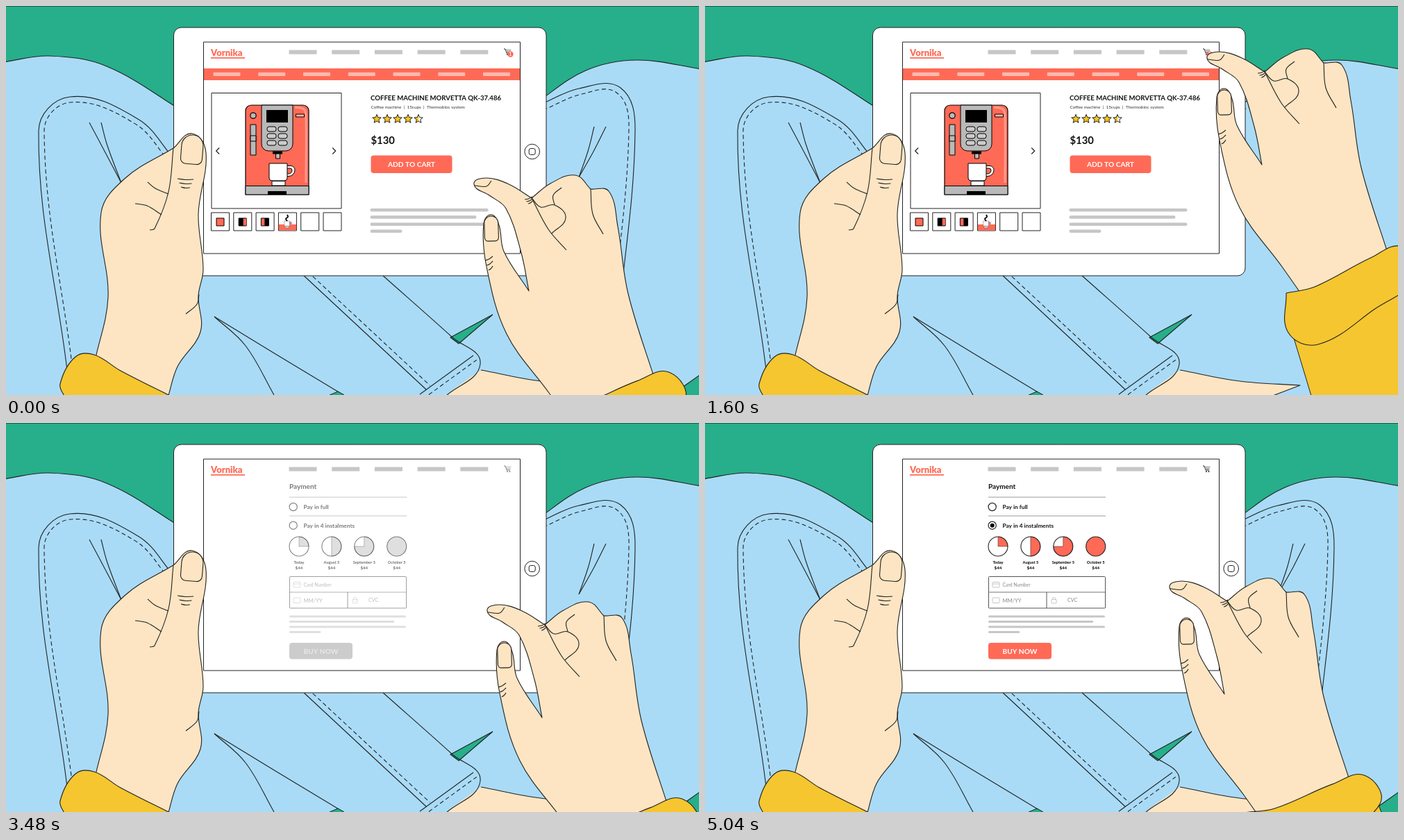
An HTML page with a canvas for the animation above (5.6 s loop, 998x561 px).

```html
<!DOCTYPE html>
<html lang="en">
<head>
<meta charset="utf-8">
<title>Paying in instalments</title>
<style>
html, body { margin: 0; width: 100%; height: 100%; overflow: hidden; }
canvas { display: block; }
</style>
</head>
<body>
<canvas id="stage" width="998" height="561"></canvas>
<script>
const g = document.getElementById('stage').getContext('2d');
const LOOP = 5600, STEP = 40, LAST = 5040;
const INK = '#222', CORAL = '#ff6a56', DARK_CORAL = '#e95543', GREY = '#c6c6c6', STEEL = '#b9b9b9';
const SKIN = '#fde5c3', YELLOW = '#f5c62f', BLUE = '#a9dbf7', GREEN = '#26af8a';

// Stops of the pointing fingertip: time, x, y
const TIP = [
  [0, 674, 256], [520, 562, 232], [800, 610, 221], [1200, 682, 130], [1600, 723, 74],
  [1800, 720, 61], [2160, 708, 106], [2400, 700, 196], [2800, 693, 270], [3600, 693, 270],
  [4000, 504, 181], [4240, 412, 138], [4800, 618, 199], [LAST, 669, 236]
];
const PANEL = [[1740, 150], [1960, -10], [2160, 4], [2360, 0]];

const clamp = (v, a = 0, b = 1) => Math.min(b, Math.max(a, v));
const ramp = (t, a, b) => clamp((t - a) / (b - a));
const repeat = (n, draw) => { for (let i = 0; i < n; i++) draw(i); };

// Cubic interpolation that rests wherever the direction turns
function track(keys, t, c) {
  const n = keys.length - 1;
  if (t <= keys[0][0]) return keys[0][c];
  if (t >= keys[n][0]) return keys[n][c];
  const i = keys.findIndex(k => k[0] > t) - 1;
  const slope = j => (keys[j + 1][c] - keys[j][c]) / (keys[j + 1][0] - keys[j][0]);
  const tangent = j => {
    if (j === 0 || j === n) return 0;
    const a = slope(j - 1), b = slope(j);
    return a * b <= 0 ? 0 : 2 * a * b / (a + b);
  };
  const h = keys[i + 1][0] - keys[i][0], u = (t - keys[i][0]) / h, v = 1 - u;
  return v * v * (1 + 2 * u) * keys[i][c] + u * u * (3 - 2 * u) * keys[i + 1][c]
    + h * (u * v * v * tangent(i) - u * u * v * tangent(i + 1));
}

function paint(fill, stroke, width = 1) {
  if (fill) { g.fillStyle = fill; g.fill(); }
  if (stroke) { g.strokeStyle = stroke; g.lineWidth = width; g.stroke(); }
}
function box(x, y, w, h, fill, stroke, r = 0, width = 1) {
  g.beginPath();
  g.roundRect(x, y, w, h, r);
  paint(fill, stroke, width);
}
function disc(x, y, r, fill, stroke, width = 1) {
  g.beginPath();
  g.arc(x, y, r, 0, 7);
  paint(fill, stroke, width);
}
function poly(p, fill, stroke, width = 1) {
  g.beginPath();
  for (let i = 0; i < p.length; i += 2) g.lineTo(p[i], p[i + 1]);
  paint(fill, stroke, width);
}
const line = (p, color = INK, width = 1) => poly(p, null, color, width);
const rule = (x, y, w, color = '#999') => line([x, y, x + w, y], color, 1.2);

function text(s, x, y, size, color = '#111', weight = 400, align = 'left') {
  g.font = `${weight} ${size}px Lato, sans-serif`;
  g.fillStyle = color;
  g.textAlign = align;
  g.fillText(s, x, y);
}
function placed(x, y, scale, angle, draw) {
  g.save();
  g.translate(x, y);
  g.rotate(angle);
  g.scale(scale, scale);
  draw();
  g.restore();
}

const point = (p, i) => {
  const k = clamp(i, 0, p.length / 2 - 1) * 2;
  return [p[k], p[k + 1]];
};
// Unit direction of a curve at one of its points
function heading(p, i) {
  const [ax, ay] = point(p, i - 1), [bx, by] = point(p, i + 1);
  const d = Math.hypot(bx - ax, by - ay) || 1;
  return [(bx - ax) / d, (by - ay) / d];
}
// Smooth curve through points; a doubled point makes a corner
function spline(p, fill, stroke = INK, width = 1.1) {
  g.beginPath();
  g.moveTo(p[0], p[1]);
  for (let i = 0; i < p.length / 2 - 1; i++) {
    const [ax, ay] = point(p, i), [bx, by] = point(p, i + 1);
    const [ux, uy] = heading(p, i), [vx, vy] = heading(p, i + 1);
    const d = Math.hypot(bx - ax, by - ay) * .36;
    g.bezierCurveTo(ax + ux * d, ay + uy * d, bx - vx * d, by - vy * d, bx, by);
  }
  paint(fill, stroke, width);
}
// A curve with a line of stitches running beside it
function seam(p, gap, curve = true) {
  if (curve) spline(p);
  const side = p.map((v, k) => {
    const [ux, uy] = heading(p, k >> 1);
    return v + gap * (k % 2 ? -ux : uy);
  });
  g.setLineDash([6, 4]);
  spline(side);
  g.setLineDash([]);
}
function wrinkles(x, y, w, rise, gap) {
  repeat(3, i => {
    const a = x + i * 2.5, b = a + w * (1 - i * .22);
    spline([a, y + i * gap, (a + b) / 2, y + i * gap + 1 - rise / 2, b, y + i * gap - rise]);
  });
}

function background() {
  box(0, 0, 998, 561, GREEN);
  rule(0, .5, 998, 'rgba(0,0,0,.45)');
  spline([-4, 81, 62, 72, 145, 87, 260, 155, 260, 155, 260, 565, 260, 565, -4, 565], BLUE);
  spline([760, 142, 835, 93, 908, 78, 1002, 91, 1002, 91, 1002, 530, 1002, 530, 957, 562, 957, 562, 760, 562], BLUE);
  box(240, 165, 540, 396, BLUE);

  seam([241, 219, 190, 163, 92, 131, 47, 180, 88, 525], 8);
  seam([770, 142, 825, 119, 885, 118, 906, 180, 881, 462], -9);
  for (const x of [120, 137]) spline([x, 168, x / 2 + 77, 200, 166, 255]);
  for (const x of [847, 864]) spline([x, 174, x / 2 + 415, 208, 825, 247]);

  spline([300, 448, 345, 490, 386, 561]);
  spline([300, 448, 385, 500, 486, 561]);
  poly([466, 561, 478, 556, 487, 561], GREEN, INK);
  spline([701, 445, 640, 478, 640, 478, 652, 487, 652, 487, 701, 445], GREEN);
  spline([684, 525, 770, 541, 857, 547, 857, 547, 815, 563, 815, 563, 630, 563], SKIN);
  poly([429, 389, 605, 553, 603, 561, 634, 561, 682, 522], BLUE);
  seam([429, 389, 605, 553], 8);
  spline([543, 389, 643, 478, 683, 516, 634, 562]);
  seam([596, 560, 673, 504], -8);
}

function cartIcon(x, y) {
  line([x - 5, y - 4, x - 3, y - 4, x - 1, y + 2, x + 4, y + 2]);
  repeat(3, i => rule(x - 2.5 + i / 2, y - 3 + i * 1.8, 8 - i));
  for (const wheel of [0, 3.5]) disc(x + wheel, y + 4, 1, INK);
}

function cup() {
  box(401, 230.5, 15, 15, '#fff', '#000', [2, 6, 9, 2]);
  box(403, 234, 9, 8, CORAL, '#000', [1, 3, 5, 1]);
  box(379, 227, 26, 25, '#fff', '#000', [0, 0, 4, 4]);
  box(383, 252.5, 19, 6.5, '#fff', '#000');
}

function machine() {
  box(345, 143, 91, 129, CORAL, '#000', [8, 8, 0, 0], 1.2);
  spline([416, 146, 429, 149, 432, 160, 432, 255], null, '#ff9a8b', 3);
  box(368, 143, 45, 66, STEEL, '#000', [0, 0, 10, 10]);
  box(375, 150, 31, 18, '#000');
  repeat(6, i => box(376 + i % 2 * 16, 174 + (i >> 1) * 10, 13, 7, '#ccc', '#000', 3));
  box(384, 209.5, 14, 4, '#000');
  box(388.5, 213, 6, 7, STEEL, '#000');
  disc(356, 158, 4.2, STEEL, '#000', 1.2);
  box(417.5, 156, 12, 4, '#ffb5a9', '#000');
  box(352, 171, 8, 44, STEEL, '#000');
  box(352, 187, 8, 8, STEEL, '#000');
  box(345, 259.5, 91, 12.5, STEEL, '#000');
  box(377, 267, 27, 5, '#000');
  cup();
}

function star(x, y, half) {
  const p = [];
  repeat(11, i => {
    const a = i * Math.PI / 5 - Math.PI / 2, r = i % 2 ? 2.9 : 6.6;
    p.push(x + r * Math.cos(a), y + r * Math.sin(a));
  });
  poly(p, half ? '#fff' : '#fcc419');
  if (half) poly(p.slice(10), '#fcc419');
  line(p);
}

// Grey bars standing for a paragraph
function paragraph(x, y, width, gap, height) {
  [1, .9, 1, .27].forEach((part, i) => box(x, y + i * gap, width * part, height, GREY, null, height / 2));
}
function button(label, x, y, w, h, color) {
  box(x, y, w, h, color, null, 4);
  text(label, x + w / 2, y + h / 2 + 3.8, 10.2, '#fff', 700, 'center');
}

function header() {
  text('Vornika', 295, 72, 13, CORAL, 900);
  box(295, 74, 49, 1.7, CORAL);
  repeat(5, i => box(407.5 + i * 61.7, 63.5, 40, 6, GREY));
}

function thumbnails() {
  repeat(6, i => box(295.5 + i * 32.3, 298, 26, 26, '#fff', INK));
  repeat(3, i => {
    const x = 303 + i * 32.2;
    box(x, 306, 11, 11, i ? '#000' : CORAL, '#000');
    if (i) box(x + (i === 1 ? 6.5 : .5), 306.5, 4.5, 10, CORAL);
  });
  box(393, 315, 25, 8.6, CORAL);
  placed(287, 242, .3, 0, cup);
  spline([405, 310, 403, 307, 406, 304, 405, 301], null, '#000', 1.8);
}

function product(t) {
  header();
  cartIcon(722, 66);
  disc(726.5, 69.5, 4.2, CORAL);
  text(t < 600 ? '1' : '2', 726.5, 72, 6.5, '#fff', 700, 'center');
  box(284.5, 90, 456, 17, CORAL);
  repeat(7, i => box(298.5 + i * 64.75, 95.8, 39, 5.2, '#ffb9ae', null, 1));

  box(296, 125.5, 187, 166.5, '#fff', INK);
  machine();
  for (const side of [-1, 1]) {
    const x = 388.7 + side * 81.5;
    line([x, 204.5, x + side * 4.5, 209, x, 213.5], INK, 1.2);
  }
  thumbnails();

  text('COFFEE MACHINE MORVETTA QK-37.486', 525, 136, 9.6, '#111', 700);
  text('Coffee machine  |  15cups  |  Thermobloc system', 525.5, 147.5, 6.4, '#333');
  repeat(5, i => star(534 + i * 15, 163, i === 4));
  text('$130', 525.5, 199, 14.8, '#111', 700);
  button('ADD TO CART', 525.5, 215.5, 117, 25.5, t >= 520 && t < 640 ? DARK_CORAL : CORAL);
  paragraph(524.5, 292, 170, 10.2, 4.5);
}

function hairdryer() {
  line([619, 165, 634, 163], '#000', 7);
  disc(634, 163, 4.8, '#000');
  line([627, 165, 629, 181], '#000', 5);
}

function cartPanel(t) {
  if (t < PANEL[0][0]) return;
  g.save();
  g.translate(track(PANEL, t, 1), 0);
  box(594.5, 52, 170, 305, '#fff', '#777');
  text('Cart', 607, 70, 10.2);
  cartIcon(723, 66);
  for (const y of [81, 140, 199, 242]) rule(607, y, 125);
  [['Coffee machine', '$130'], ['Hairdryer', '$40']].forEach(([name, price], i) => {
    const y = 90.5 + i * 57.5;
    box(606.5, y, 45, 42, '#fff', '#777');
    text(name, 658, y + 7, 7.2, '#111', 700);
    repeat(2, k => box(658, y + 31.5 + k * 7, 35, 3, GREY, null, 1));
    text(price, 731, y + 40, 9, '#111', 700, 'right');
  });
  placed(529.7, 61, .25, 0, machine);
  hairdryer();
  [['Subtotal:', '$170', 216], ['Shipping:', '$6', 231], ['Total incl taxes:', '$176', 258.5]].forEach(([name, sum, y]) => {
    text(name, 607, y, 7.1, '#111', 700);
    text(sum, 731, y + .5, 9, '#111', 700, 'right');
  });
  button('PAY', 608, 267, 133, 23.5, t >= 2840 && t < 3000 ? DARK_CORAL : CORAL);
  g.restore();
}

function payment(chosen) {
  cartIcon(722, 66);
  text('Payment', 408, 95, 10, '#111', 700);
  ['Pay in full', 'Pay in 4 instalments'].forEach((label, i) => {
    const y = 121 + i * 26.7;
    rule(408, 107 + i * 27, 169);
    disc(413.7, y, 5.6, '#fff', INK, 1.2);
    text(label, 428.5, y + 3.2, 8.3, '#111', 700);
    if (i && chosen) disc(413.7, y, 3, '#000');
  });
  ['Today', 'August 5', 'September 5', 'October 5'].forEach((day, i) => {
    const x = 422 + i * 46.9;
    disc(x, 178, 14, '#fff');
    g.beginPath();
    g.moveTo(x, 178);
    g.arc(x, 178, 14, -Math.PI / 2, i * Math.PI / 2);
    g.closePath();
    paint(chosen ? CORAL : GREY, i < 3 && INK, .5);
    disc(x, 178, 14, null, INK, 1.1);
    text(day, x, 202.5, 5.7, '#000', 700, 'center');
    text('$44', x, 210.5, 6.2, '#000', 700, 'center');
  });
  box(408.5, 221.5, 168, 45.5, '#fff', '#555', 1);
  rule(408, 244, 168, '#777');
  line([492, 244, 492, 267], '#555');
  for (const y of [229.5, 252]) box(414, y, 10, 7.5, null, GREY, 1);
  rule(414, 232, 10, GREY);
  box(500, 251.5, 5, 6, null, GREY, 2.5);
  box(499, 254.5, 7, 5.5, '#fff', GREY, 1);
  text('Card Number', 428.5, 235.6, 6.8, '#888');
  text('MM/YY', 428.5, 258.5, 7.6, '#888');
  text('CVC', 522, 258.3, 7.2, '#888');
  paragraph(408, 277.5, 168, 7.5, 3);
  button('BUY NOW', 408, 317, 91, 23.5, chosen ? CORAL : '#a3a3a3');
}

function tablet(t) {
  box(241.5, 31, 536.5, 358, '#fff', INK, 11);
  disc(757.7, 210, 10.8, '#fff', INK);
  box(753.2, 205.5, 9, 9, '#fff', INK, 2.5);
  g.save();
  g.beginPath();
  g.rect(284, 51.5, 457, 306);
  g.clip();
  const cover = ramp(t, 3120, 3400);
  if (cover < 1) {
    product(t);
    cartPanel(t);
  }
  if (cover > 0) {
    g.globalAlpha = cover;
    box(284, 51, 458, 307, '#fff');
    header();
    g.globalAlpha = ramp(t, 3280, 3640);
    payment(t >= 4280);
  }
  g.restore();
  box(284.5, 52, 456, 305, null, INK);
}

function nail(x, y, w, h, angle) {
  placed(x, y, 1, angle, () => box(-w / 2, -h / 2, w, h, SKIN, INK, [w / 2, w / 2, w / 4, w / 4], 1.1));
}

function leftHand() {
  spline([128, 512, 147, 420, 137, 298, 172, 248, 241, 205, 241, 205, 268, 184, 288, 212,
    277, 300, 284, 380, 277, 418, 280, 470, 247, 520, 233, 565], SKIN);
  spline([241, 205, 234, 268, 214, 321, 207, 323]);
  spline([278, 416, 275, 430, 259, 444]);
  spline([204, 254, 215, 263, 234, 271]);
  spline([186, 285, 203, 288, 224, 301]);
  nail(268, 207, 31, 42, .08);
  wrinkles(247, 249, 23, -1, 6);
  spline([85, 565, 78, 545, 100, 506, 127, 503, 165, 526, 242, 565], YELLOW);
}

function rightHand(x, y) {
  g.save();
  g.translate(x, y);
  spline([152, 365, 108, 302, 47, 217, 18, 120, 14, 57, 25, 45, 36, 60, 43, 98, 79, 155, 79, 155,
    68, 100, 46, 36, 22, 17, 0, 1, 18, -8, 50, 1, 83, 21, 83, 21, 110, 0, 146, -12, 168, 8, 168, 8,
    194, 11, 207, 62, 222, 159, 262, 288], SKIN);
  spline([83, 21, 107, 66, 133, 96]);
  spline([83, 21, 96, 34, 116, 31, 132, 50, 112, 72]);
  spline([116, 31, 114, 17, 126, 6]);
  spline([168, 8, 171, 44, 186, 73]);
  spline([1, 3, 18, 4, 25, -4]);
  nail(25, 65, 20, 36, -.03);
  wrinkles(16, 111, 11, 6, 7);
  wrinkles(73, 23, 11, 4, 3);

  // The cuff tilts as the hand sinks
  g.translate(290, 275);
  g.rotate(.08 * ramp(y, 181, 221));
  g.translate(-290, -275);
  poly([125, 405, 205, 670, 450, 600, 304, 314], YELLOW, INK);
  spline([114, 340, 155, 331, 236, 289, 281, 273, 306, 312, 240, 364, 160, 414, 117, 397, 114, 340], YELLOW);
  g.restore();
}

function frame(now) {
  const t = Math.min(LAST, Math.floor((now % LOOP) / STEP) * STEP);
  background();
  tablet(t);
  leftHand();
  rightHand(track(TIP, t, 1), track(TIP, t, 2));
}

let start = null;
function tick(now) {
  start ??= now;
  frame(now - start);
  requestAnimationFrame(tick);
}
g.lineJoin = 'round';
frame(0);
requestAnimationFrame(tick);
</script>
</body>
</html>
```
